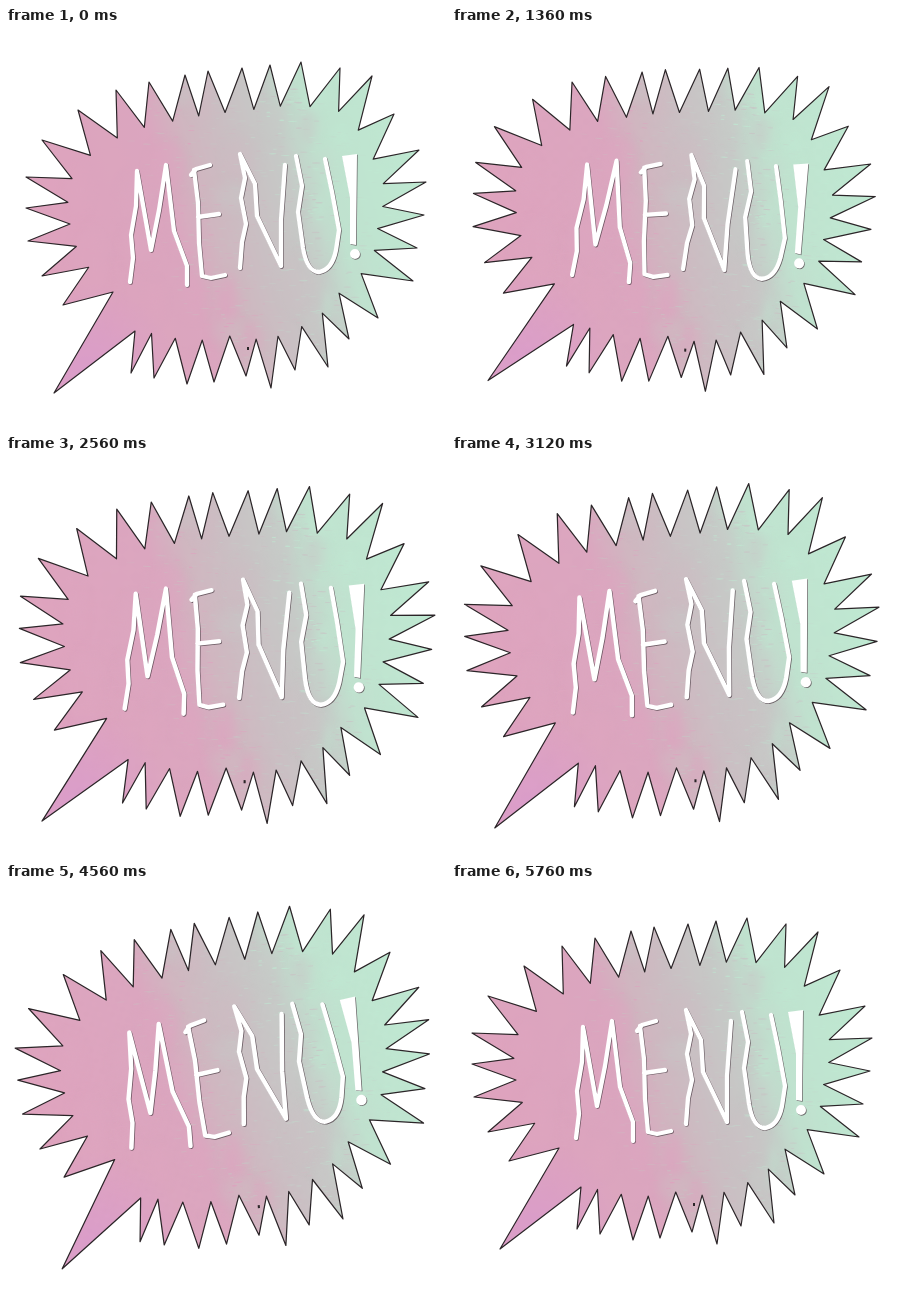
An HTML page with a canvas for the animation above (5840 ms loop, 440x400 px).

```html
<!DOCTYPE html>
<html lang="en">
<head>
<meta charset="utf-8">
<title>Menu</title>
<style>
html, body { margin: 0; width: 100%; height: 100%; overflow: hidden; background: #fff; }
canvas { display: block; }
</style>
</head>
<body>
<canvas id="stage" width="440" height="400" role="img" aria-label="MENU!"></canvas>
<script>
const ctx = document.getElementById('stage').getContext('2d');
const W = 440, H = 400, CX = W / 2, CY = H / 2;
const LOOP = 5840, STEP = 80, END = 5760, PULSE = END / 4;
const INK = '#2b2528';

// Swing in degrees at the turning points
const SWING = [[0, 0], [1800, 5.5], [2880, 0.4], [5180, -6.5], [END, 0]];

// Spike tips, clockwise from the tail
const TIPS = `57,277 36,248 22,213 20,180 20,149 36,112 72,82 110,62 143,54 179,47 202,43
  236,40 264,37 295,34 334,40 366,48 388,86 413,122 420,154 418,187 411,220 407,253 372,290
  343,311 322,339 289,342 265,360 240,348 208,354 181,356 148,350 125,345`
  .split(/\s+/).map(p => p.split(',').map(Number));

const LETTERS = new Path2D(`M124 254L127 230 125 207 130 178 131 143 145 222 153 182 160 137
  168 203 181 238 181 257
  M204 137L190 141 185 147 M188 142L192 175 193 215 196 248 205 250 219 247 M192 189L213 186
  M234 240L236 214 240 196 235 170 239 150 234 126 249 156 251 188 275 238 275 192 279 137
  M290 128L296 158 292 184 297 220 Q301 244 313 244 Q326 242 330 222 L333 202 326 164 319 131`);
const MARK = new Path2D(`M336 128L351 126 350 217 344 216 344 170Z
  M354 226A5 5 0 1 1 344 226A5 5 0 1 1 354 226Z`);

// Each notch lies a fixed depth in from its two tips, aimed at the bubble's spine
function notch([ax, ay], [bx, by]) {
  const x = (ax + bx) / 2, y = (ay + by) / 2;
  const dx = CX + 72 * Math.tanh((x - CX) / 95) - x, dy = 195 - y;
  const k = 43 / Math.hypot(dx, dy);
  return [x + dx * k, y + dy * k];
}

function makeBubble() {
  const path = new Path2D('M129 303L48 365 107 264');
  TIPS.forEach((tip, i) => {
    if (i) path.lineTo(...notch(TIPS[i - 1], tip));
    path.lineTo(...tip);
  });
  path.closePath();
  return path;
}

function makePaint() {
  const paint = document.createElement('canvas');
  paint.width = W * 2;
  paint.height = H * 2;
  const p = paint.getContext('2d');
  p.scale(2, 2);
  const g = p.createLinearGradient(30, 230, 410, 120);
  [[0, '#dfa3be'], [0.36, '#dba6bf'], [0.45, '#d0b6c0'], [0.55, '#cabfc3'], [0.67, '#c6cac7'],
    [0.76, '#c0e2cf'], [1, '#bfe9d2']].forEach(s => g.addColorStop(...s));
  p.fillStyle = g;
  p.fillRect(0, 0, W, H);

  // Dabs pick up the wash colour from a little to one side
  let seed = 7;
  const rnd = () => (seed = seed * 16807 % 2147483647) / 2147483647;
  function dabs(count, rx, ry, shift, blur) {
    p.filter = blur ? `blur(${blur}px)` : 'none';
    for (let i = 0; i < count; i++) {
      const x = rnd() * W, y = rnd() * H, d = (rnd() - 0.5) * shift;
      p.save();
      p.translate(d, 0);
      p.beginPath();
      p.ellipse(x - d, y, rx * (0.5 + rnd()), ry * (0.5 + rnd()), 0, 0, 7);
      p.fill();
      p.restore();
    }
  }
  dabs(70, 12, 24, 55, 10);
  dabs(2500, 3, 0.5, 70, 0);
  p.filter = 'none';

  const tail = p.createRadialGradient(80, 345, 0, 80, 345, 90);
  tail.addColorStop(0, 'rgba(217,155,205,.8)');
  tail.addColorStop(1, 'rgba(217,155,205,0)');
  p.fillStyle = tail;
  p.fillRect(0, 0, W, H);
  return paint;
}

const bubble = makeBubble(), paint = makePaint();

function swing(t) {
  const i = Math.max(1, SWING.findIndex(k => t <= k[0]));
  const [t0, a] = SWING[i - 1], [t1, b] = SWING[i];
  return a + (b - a) * (t - t0) / (t1 - t0);
}

// Four pulses per loop, rising a little faster than they fall
const pulse = t => 1 + 0.105 * Math.sin(Math.PI * (t % PULSE / PULSE) ** 0.9) ** 2;

function lettering(color, offset) {
  ctx.save();
  ctx.translate(offset, offset);
  ctx.strokeStyle = ctx.fillStyle = color;
  ctx.lineWidth = 4.3;
  ctx.stroke(LETTERS);
  ctx.fill(MARK);
  ctx.restore();
}

function draw(time) {
  const t = Math.min(Math.floor(time % LOOP / STEP) * STEP, END);
  const s = pulse(t);
  ctx.setTransform(1, 0, 0, 1, 0, 0);
  ctx.fillStyle = '#fff';
  ctx.fillRect(0, 0, W, H);
  ctx.translate(CX, CY);
  ctx.rotate(swing(t) * Math.PI / 180);
  ctx.scale(s, s);
  ctx.translate(-CX, -CY);
  ctx.lineJoin = ctx.lineCap = 'round';

  ctx.save();
  ctx.clip(bubble);
  ctx.drawImage(paint, 0, 0, W, H);
  ctx.restore();
  ctx.strokeStyle = ctx.fillStyle = INK;
  ctx.lineWidth = 1.2;
  ctx.stroke(bubble);
  ctx.fillRect(241, 319, 2, 3);

  lettering('rgba(75,60,68,.75)', 0.7);
  lettering('#fff', 0);
}

const start = performance.now();
function tick() {
  draw(performance.now() - start);
  requestAnimationFrame(tick);
}
tick();
</script>
</body>
</html>
```
